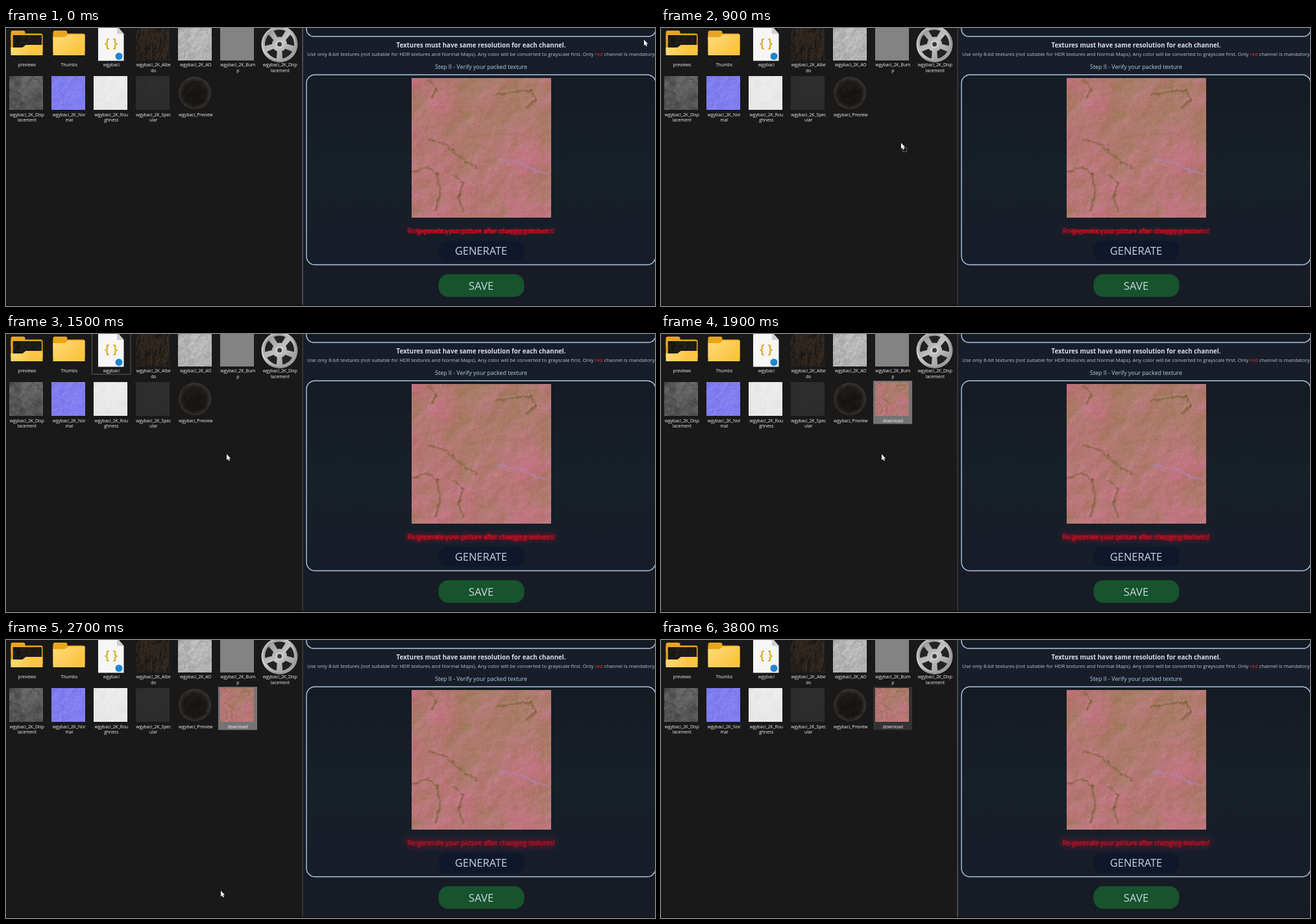
These frames come from a looping animation (1000 px wide and 428 px high, 3900 ms). An HTML page with a canvas:

```html
<!DOCTYPE html>
<html lang="en">
<head>
<meta charset="utf-8">
<title>Texture packer</title>
<style>
html, body { margin: 0; width: 100%; height: 100%; overflow: hidden; background: #191919; }
canvas { display: block; width: 1000px; height: 428px; }
</style>
</head>
<body>
<canvas id="stage" width="1000" height="428"></canvas>
<script>
const ctx = document.getElementById('stage').getContext('2d');
const LOOP = 3900, STEP = 100;
const FONT = '"Open Sans", "Noto Sans", sans-serif';

// ---------- procedural rock ----------
const hash = (x, y) => {
  const s = Math.sin(x * 127.1 + y * 311.7) * 43758.5453;
  return s - Math.floor(s);
};
const mix = (a, b, k) => a + (b - a) * k;
const smooth = k => k * k * (3 - 2 * k);

function noise(x, y) {
  const i = Math.floor(x), j = Math.floor(y), u = smooth(x - i), v = smooth(y - j);
  return mix(mix(hash(i, j), hash(i + 1, j), u), mix(hash(i, j + 1), hash(i + 1, j + 1), u), v);
}

function fbm(x, y) {
  let sum = 0, amp = 0.5;
  for (let o = 0; o < 5; o++) {
    sum += amp * noise(x, y);
    x = x * 2.03 + 7; y = y * 2.03 + 3; amp *= 0.5;
  }
  return sum;
}

const VEINS = [
  [[.126, .44], [.21, .455], [.3, .52], [.4, .61], [.475, .655]],
  [[.3, .69], [.36, .74], [.34, .85], [.37, .97]],
  [[.61, .12], [.74, .09], [.86, .09], [.89, .16], [.81, .22]],
  [[.12, .01], [.17, .07], [.14, .15]],
  [[0, .68], [.1, .63], [.19, .69], [.2, .83], [.16, .97]]
];
const RIDGE = [[.62, .58], [.77, .6], [.88, .66], [1, .69]];

// A broken line of uneven thickness through the given points
function vein(g, size, pts, color, width, shift) {
  const cuts = 7;
  let n = 0, last = null;
  g.strokeStyle = color;
  g.lineCap = 'butt';
  for (let i = 0; i < pts.length - 1; i++) {
    for (let k = 0; k < cuts; k++, n++) {
      const at = c => (mix(pts[i][c], pts[i + 1][c], k / cuts) + (hash(n, c + i) - .5) * .022) * size + shift;
      const p = [at(0), at(1)];
      if (last) {
        g.beginPath();
        g.moveTo(...last);
        g.lineTo(...p);
        g.lineWidth = width * (.3 + 1.1 * hash(n, 5));
        g.stroke();
      }
      last = p;
    }
  }
}

function rock(size, o) {
  const c = document.createElement('canvas');
  c.width = c.height = size;
  const g = c.getContext('2d'), img = g.createImageData(size, size);
  const sx = o.sx || 5, sy = o.sy || 5;
  for (let y = 0, p = 0; y < size; y++) {
    for (let x = 0; x < size; x++, p += 4) {
      const u = x / size * sx, v = y / size * sy;
      const h = fbm(u, v), d = (h - fbm(u + .07, v + .07)) * 4;
      const grain = (hash(x, y + 900) - .5) * (o.grain || 0);
      for (let k = 0; k < 3; k++)
        img.data[p + k] = o.base[k] + o.light[k] * d + o.tint[k] * (h - .48) + grain;
      img.data[p + 3] = 255;
    }
  }
  g.putImageData(img, 0, 0);
  const w = size / 215;
  if (o.dark) for (const pts of VEINS) {
    vein(g, size, pts, o.dark, .6 + 5 * w, 0);
    vein(g, size, pts, o.dark, .3 + 1.4 * w, 0);
    vein(g, size, pts, o.pale, .3 + 2 * w, -3 * w);
  }
  if (o.pale) vein(g, size, RIDGE, o.ridge || o.pale, .3 + 3 * w, 0);
  return c;
}

const PACKED = {
  base: [179, 120, 114], light: [30, 12, 46], tint: [-45, 15, -45], grain: 14,
  dark: 'rgba(108,92,35,.32)', pale: 'rgba(205,135,165,.3)', ridge: 'rgba(165,140,205,.5)'
};
const gray = (b, l, t) => ({ base: [b, b, b], light: [l, l, l], tint: [t, t, t] });
const packed = rock(215, PACKED), packedThumb = rock(52, PACKED);
const albedo = rock(52, { base: [40, 33, 28], light: [36, 26, 19], tint: [40, 26, 14], sx: 14, sy: 5, grain: 14 });
const ao = rock(52, { ...gray(180, 40, 30), grain: 8, dark: 'rgba(120,120,120,.3)', pale: 'rgba(235,235,235,.35)' });
const disp = rock(52, { ...gray(90, 16, 60), dark: 'rgba(45,45,45,.3)', pale: 'rgba(140,140,140,.25)' });
const normal = rock(52, {
  base: [128, 126, 240], light: [32, 30, 8], tint: [0, 0, 0],
  dark: 'rgba(95,90,215,.3)', pale: 'rgba(170,165,255,.4)'
});
const rough = rock(52, { ...gray(233, 7, 12), grain: 5 });
const spec = rock(52, { ...gray(45, 2, 4), grain: 2 });
const ballSkin = rock(52, { base: [46, 42, 39], light: [30, 26, 23], tint: [30, 26, 22], sx: 7, sy: 7, grain: 10 });

// ---------- helpers ----------
function text(s, x, y, size, color, align = 'center', weight = 400) {
  ctx.font = `${weight} ${size}px ${FONT}`;
  ctx.textAlign = align;
  ctx.fillStyle = color;
  ctx.fillText(s, x, y);
}

function box(x, y, w, h, r, fill, stroke, line = 1) {
  ctx.beginPath();
  ctx.roundRect(x, y, w, h, r);
  if (fill) { ctx.fillStyle = fill; ctx.fill(); }
  if (stroke) { ctx.strokeStyle = stroke; ctx.lineWidth = line; ctx.stroke(); }
}

function shape(points, fill) {
  ctx.beginPath();
  points.forEach(p => ctx.lineTo(...p));
  ctx.closePath();
  ctx.fillStyle = fill;
  ctx.fill();
}

function disc(x, y, r, fill) {
  ctx.beginPath();
  ctx.arc(x, y, r, 0, 7);
  ctx.fillStyle = fill;
  ctx.fill();
}

function fade(x0, y0, x1, y1, ...colors) {
  const g = ctx.createLinearGradient(x0, y0, x1, y1);
  colors.forEach((c, i) => g.addColorStop(i / (colors.length - 1), c));
  return g;
}

const colX = c => 32 + 65 * c;

function label(c, row, ...lines) {
  lines.forEach((s, i) => text(s, colX(c) + .3, (row ? 135.7 : 59.3) + i * 8.5, 6.75, '#f0f0f0'));
}

// ---------- file icons ----------
function folder(x, filled) {
  box(x, 4, 22, 16, 3, '#e9a51d');
  box(x, 8.5, 49, 30, 3, '#e9a51d');
  if (filled) {
    ctx.drawImage(ballSkin, 0, 0, 52, 22, x + 3, 11, 44, 22);
    ctx.fillStyle = 'rgba(0,0,0,.4)';
    ctx.fillRect(x + 3, 11, 44, 22);
  }
  const top = filled ? 26 : 10;
  shape([[x, top + 4], [x + 18, top + 4], [x + 23, top], [x + 49, top], [x + 49, 42], [x, 42]],
    fade(x, top, x + 30, 42, '#ffdc7c', '#fac543'));
}

function jsonFile() {
  shape([[142, -3], [171, -3], [181.5, 9], [181.5, 50.5], [142, 50.5]], '#f6f6f6');
  shape([[171, -3], [181.5, 9], [171, 9]], '#cfcfcf');
  text('{ }', 162, 30, 19, '#d9b42f', 'center', 700);
  disc(174, 43.5, 5.5, '#1f86cf');
}

function reel() {
  const x = 421.5, y = 25;
  disc(x, y, 28, fade(394, 0, 450, 52, '#a8a8a8', '#d8d8d8', '#8d8d8d', '#b5b5b5'));
  disc(x, y, 25.5, fade(400, 0, 445, 50, '#929292', '#c4c4c4', '#8c8c8c'));
  for (let i = 0; i < 5; i++) {
    const a = Math.PI * (.4 * i - .5), half = .42;
    ctx.beginPath();
    ctx.arc(x, y, 22.5, a - half, a + half);
    ctx.arc(x, y, 11.5, a + half * .7, a - half * .7, true);
    ctx.closePath();
    ctx.fillStyle = '#232323';
    ctx.fill();
  }
  disc(x, y, 6, '#d0d0d0');
  disc(x, y, 3.5, '#3a3a3a');
}

function ball() {
  ctx.save();
  ctx.beginPath();
  ctx.arc(291, 100, 25, 0, 7);
  ctx.clip();
  ctx.drawImage(ballSkin, 265, 74);
  const g = ctx.createRadialGradient(291, 103, 2, 291, 100, 25);
  g.addColorStop(0, 'rgba(8,7,6,.6)');
  g.addColorStop(.7, 'rgba(8,7,6,.5)');
  g.addColorStop(1, 'rgba(62,58,54,.5)');
  ctx.fillStyle = g;
  ctx.fillRect(265, 74, 52, 52);
  ctx.restore();
}

function files(t) {
  ctx.fillStyle = '#191919';
  ctx.fillRect(0, 0, 457, 428);
  if (t >= 1300 && t < 1900) box(132.5, -4, 59.5, 66, 0, null, '#5d5d5d');
  folder(7.5, true);
  folder(72.5, false);
  jsonFile();
  ctx.drawImage(albedo, 200, -2);
  ctx.drawImage(ao, 265, -2);
  ctx.fillStyle = '#838383';
  ctx.fillRect(330, -2, 52, 52);
  reel();
  [disp, normal, rough, spec].forEach((im, i) => ctx.drawImage(im, 5 + 65 * i, 74));
  ball();

  label(0, 0, 'previews');
  label(1, 0, 'Thumbs');
  label(2, 0, 'wgybaci');
  label(3, 0, 'wgybaci_2K_Albe', 'do');
  label(4, 0, 'wgybaci_2K_AO');
  label(5, 0, 'wgybaci_2K_Bum', 'p');
  label(6, 0, 'wgybaci_2K_Disp', 'lacement');
  label(0, 1, 'wgybaci_2K_Disp', 'lacement');
  label(1, 1, 'wgybaci_2K_Nor', 'mal');
  label(2, 1, 'wgybaci_2K_Rou', 'ghness');
  label(3, 1, 'wgybaci_2K_Spec', 'ular');
  label(4, 1, 'wgybaci_Preview');

  if (t >= 1900) {
    ctx.fillStyle = t < 3700 ? '#747474' : '#333';
    ctx.fillRect(327, 72, 60, 66.5);
    ctx.drawImage(packedThumb, 330, 74);
    label(5, 1, 'download');
  }
}

// ---------- packer page ----------
const GLOW = [[0, 0], [900, .1], [1500, .45], [2200, .7], [2700, .95], [3200, 1], [3800, .85], [3900, .85]];
const PATH = [[0, 983, 18], [700, 378, 173], [900, 370, 177], [1200, 340, 185], [2300, 340, 185], [2700, 331, 386], [2900, 329, 402]];

function sample(keys, t) {
  let i = 0;
  while (i < keys.length - 2 && t >= keys[i + 1][0]) i++;
  const a = keys[i], b = keys[i + 1], k = Math.min(1, (t - a[0]) / (b[0] - a[0]));
  return a.slice(1).map((v, n) => mix(v, b[n + 1], k));
}

function warning(t) {
  const [k] = sample(GLOW, t), s = 'Re-generate your picture after changing textures!';
  const color = `rgb(${mix(215, 185, k)},${mix(12, 24, k)},${mix(30, 36, k)})`;
  ctx.save();
  ctx.shadowColor = `rgba(235,0,25,${mix(.9, .75, k)})`;
  ctx.shadowBlur = mix(2.5, 10, k);
  text(s, 732, 316.3, 9.95, color);
  if (k > .4) text(s, 732, 316.3, 9.95, color);
  ctx.restore();
  ctx.strokeStyle = color;
  ctx.lineWidth = mix(.5, .1, k);
  ctx.strokeText(s, 732, 316.3);
}

function page(t) {
  ctx.fillStyle = fade(0, 0, 0, 428, '#181e29', '#171c27', '#161b26');
  ctx.fillRect(457, 0, 543, 428);
  const edge = '#b0c5e2';
  box(463, -40, 538, 53, 11, '#151b25', edge, 1.4);
  box(463, 72, 538, 292.5, 13, fade(0, 72, 0, 365, '#141b23', '#171f29', '#161d28'), edge, 1.4);

  text('Textures must have same resolution for each channel.', 732, 30.2, 9.68, '#d3deeb', 'center', 700);
  let x = 464;
  [['Use only 8-bit textures (not suitable for HDR textures and Normal Maps). Any color will be converted to grayscale first. Only ', '#b7c6d8'],
   ['red', '#e0343c'], [' channel is mandatory.', '#b7c6d8']].forEach(([s, c]) => {
    text(s, x, 43.2, 7.74, c, 'left');
    x += ctx.measureText(s).width;
  });
  text('Step II - Verify your packed texture', 732, 63.2, 8.92, '#b4cdea');

  ctx.drawImage(packed, 625, 77);
  warning(t);

  ctx.save();
  ctx.shadowColor = '#11162c';
  ctx.shadowBlur = 5;
  box(667, 328, 131, 30, 13, '#11172b');
  ctx.restore();
  text('GENERATE', 732, 349, 16.5, '#c6d4e6');
  box(666.5, 379, 132, 35, 15, '#17532d');
  text('SAVE', 732, 403.4, 16.8, '#c6d9dc');

  ctx.fillStyle = t >= 400 && t < 3700 ? '#60443a' : '#77777b';
  ctx.fillRect(456.5, 0, 1, 427);
  ctx.fillStyle = 'rgba(0,0,0,.45)';
  ctx.fillRect(0, 426.5, 1000, 1.5);
}

function cursor(t) {
  if (t >= 3000) return;
  const [x, y] = sample(PATH, t);
  if (t >= 700 && t < 1200) {
    ctx.setLineDash([1, 1]);
    box(x + 2.5, y + 7.5, 6, 6, 0, null, '#cfcfcf', .8);
    ctx.setLineDash([]);
  }
  shape([[0, 0], [0, 9], [2, 7.2], [3.5, 10.2], [4.9, 9.5], [3.5, 6.6], [6.2, 6.4]]
    .map(([dx, dy]) => [x + dx, y + dy]), '#fff');
}

const start = performance.now();
function draw() {
  const now = Math.max(0, performance.now() - start) % LOOP;
  const t = Math.floor(now / STEP) * STEP;
  files(t);
  page(t);
  cursor(t);
  requestAnimationFrame(draw);
}
draw();
</script>
</body>
</html>
```
